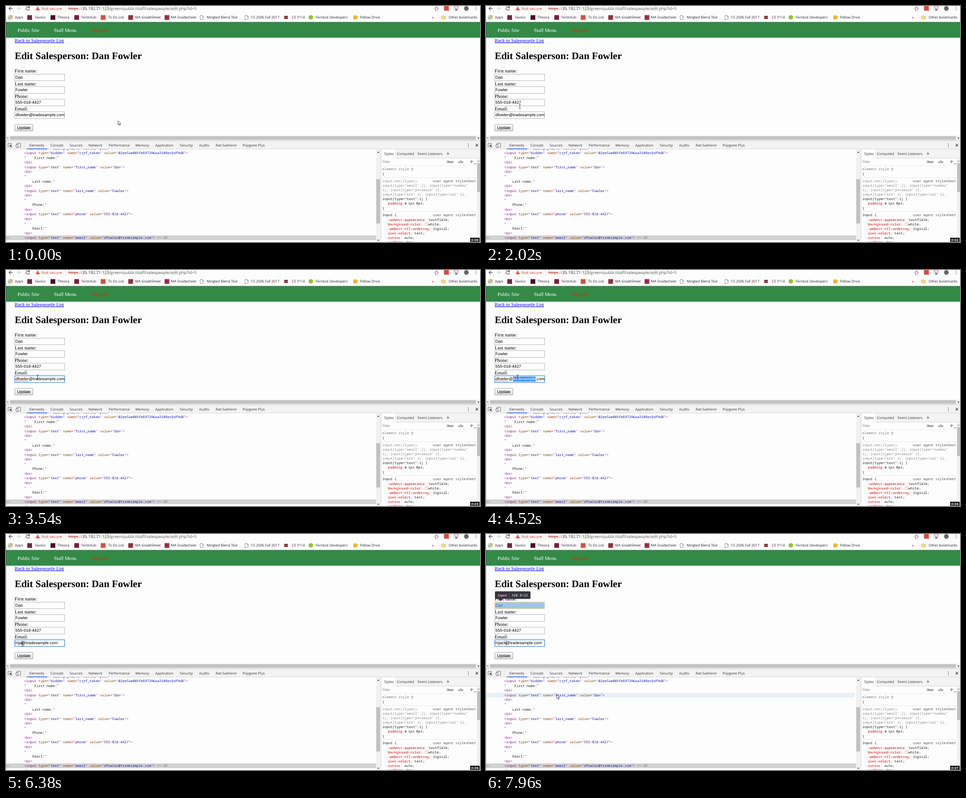
Animation of 1058x529 px, one loop 8 s. Source, as an HTML page:

```html
<!DOCTYPE html>
<html lang="en">
<head>
<meta charset="utf-8">
<title>Edit Salesperson</title>
<style>
html, body { margin: 0; width: 100%; height: 100%; overflow: hidden; background: #fdfdfd; }
svg { display: block; width: 100%; height: 100%; text-rendering: geometricPrecision; }
text { white-space: pre; }
.ui { font: 7.8px "Open Sans", "Noto Sans", sans-serif; fill: #333; }
.bar { font: 9.2px "Open Sans", "Noto Sans", sans-serif; fill: #555; }
.serif { font: 11.12px "Liberation Serif", serif; fill: #000; }
.form { font: 9.22px "Liberation Sans", sans-serif; fill: #000; }
.mono { font: 7.617px "Noto Sans Mono", "DejaVu Sans Mono", monospace; fill: #222; }
.clock { font: bold 6.9px "DejaVu Sans", sans-serif; fill: #fff; }
.tag { fill: #881280; } .attr { fill: #994500; } .val { fill: #1a1aa6; }
.prop { fill: #c80000; } .dim { fill: #888; }
</style>
</head>
<body>
<svg id="stage" viewBox="0 0 1058 529" preserveAspectRatio="none"></svg>
<script>
const stage = document.getElementById('stage');
const first = 'Dan', last = 'Fowler', phone = '555-018-4427';
const user = 'dfowler', typed = 'hijack', host = 'tradesample';
const PAPER = '#fdfdfd';
const ROW = 10.556, ROW_TOP = 324.2;
const FIELD_X = 19.6, FIELD_Y = 152.5, FIELD_W = 111.2, FIELD_H = 15, FIELD_GAP = 28.2;
const MAIL_Y = FIELD_Y + 3 * FIELD_GAP;

const esc = s => s.replace(/&/g, '&amp;').replace(/</g, '&lt;');
const text = (cls, x, y, s, more = '') => `<text class="${cls}" x="${x}" y="${y}" ${more}>${s}</text>`;
const span = (cls, s) => `<tspan class="${cls}">${esc(s)}</tspan>`;
const rect = (x, y, w, h, fill, more = '') =>
  `<rect x="${x}" y="${y}" width="${w}" height="${h}" fill="${fill}" ${more}/>`;
const path = (d, fill, stroke = 'none', more = '') => `<path d="${d}" fill="${fill}" stroke="${stroke}" ${more}/>`;
const dot = (x, y, r, fill) => `<circle cx="${x}" cy="${y}" r="${r}" fill="${fill}"/>`;
const dots = (x, y, gap, fill) => [-1, 0, 1].map(i => dot(x, y + i * gap, .9, fill)).join('');

function toolbar() {
  let s = rect(0, 35, 1058, 1, '#cfcfcf');
  s += path('M15 5.5H7M10.5 1.5L6.5 5.5L10.5 9.5', 'none', '#555', 'stroke-width="1.3"');
  s += path('M24 5.5H32M28.5 1.5L32.5 5.5L28.5 9.5', 'none', '#ccc', 'stroke-width="1.3"');
  s += path('M51.5 3A4 4 0 1 0 52.5 6.3M52.5 .5V4H49', 'none', '#555', 'stroke-width="1.3"');
  s += path('M71 1L75.5 9.5H66.5Z', '#c5372c') + rect(70.5, 4, 1, 2.8, '#fff') + rect(70.5, 7.4, 1, 1, '#fff');
  s += text('bar', 79, 9, 'Not secure', 'style="fill:#c5372c"') + rect(132, 0, .8, 11, '#ccc');
  s += text('bar', 139, 9, '<tspan fill="#c5372c" text-decoration="line-through">https</tspan>://' +
    '<tspan fill="#222">35.192.71.123</tspan>/green/public/staff/salespeople/edit.php?id=5');
  s += path('M961 1L962.4 4.3L965.8 4.6L963.2 6.8L964 10.2L961 8.4L958 10.2L958.8 6.8L956.2 4.6L959.6 4.3Z', 'none', '#666', 'stroke-width=".9"');
  s += rect(977.5, 0, 11, 10.5, '#db4c3f') + rect(999, 0, 12, 11, '#e4e4e4');
  s += path('M1003.6 7.5V6A3.2 3.2 0 1 1 1006.4 6V7.5ZM1003.6 8.4H1006.4V9.6H1003.6Z', '#fff', '#444', 'stroke-width=".9"');
  s += dot(1027.5, 5.5, 5.2, '#666') + dots(1049.5, 5.5, 3.2, '#555');

  const tints = ['#db4437', '#f4b400', '#0f9d58', '#4285f4'];
  for (let i = 0; i < 9; i++) s += rect(5.5 + i % 3 * 3.2, 21 + Math.floor(i / 3) * 3.2, 2.3, 2.3, tints[(i * 3 + 1) % 4]);
  const sheet = x => path(`M${x} 21H${x + 4.5}L${x + 7} 23.5V30.5H${x}ZM${x + 4.5} 21V23.5H${x + 7}`, '#fff', '#777', 'stroke-width=".8"');
  const box = (x, c) => rect(x, 20.5, 10.5, 10.5, c);
  s += box(47.5, '#75233c') + box(99.5, '#4a0f1c') + box(152.5, '#75233c') + box(211.5, '#db4c3f');
  s += box(273, '#993038') + box(354, '#993038') + sheet(433.5) + sheet(533.5);
  s += rect(621, 22, 8, 7, '#963c35') + dot(680.5, 25.5, 5, '#9bbf3b') + dot(779.5, 25.5, 5, '#efb727');
  s += path('M972 21.5H976L977 22.8H981V30H972Z', '#f5d489', '#e2bb62', 'stroke-width=".5"');
  s += rect(967, 20, .6, 11, '#ddd');
  [[20, 'Apps'], [64, 'Tavoro'], [115, 'Thesira'], [168, 'TerloHub'], [228, 'To Do List'],
   [288.5, 'MA GradeSheet'], [368.5, 'MA Gradesheet'], [448, 'Mingled Blend Text'],
   [547, 'CS 2506 Fall 2017'], [638, 'CS 3114'], [691, 'Fernbot Developers'],
   [790, 'Pellow Drive'], [951, '»'], [988, 'Other bookmarks']
  ].forEach(([x, w]) => s += text('ui', x, 28.3, w, 'style="fill:#222"'));
  return s;
}

const field = (y, value) => rect(FIELD_X, y, FIELD_W, FIELD_H, '#fff', 'stroke="#a9a9a9" stroke-width=".9"') +
  text('form', 21, y + 10.2, value);

function page() {
  let s = rect(0, 36, 1058, 35, '#338a47');
  s += text('serif', 25.7, 57.6, 'Public Site', 'style="fill:#fff"');
  s += text('serif', 107, 57.6, 'Staff Menu', 'style="fill:#fff"');
  s += text('serif', 190.8, 57.6, 'Log out', 'style="fill:#f31a10"');
  s += text('serif', 19.3, 81, 'Back to Salespeople List', 'style="fill:#00e" text-decoration="underline"');
  s += text('serif', 19.4, 118.8, `Edit Salesperson: ${first} ${last}`, 'style="font-weight:bold;font-size:22.25px"');
  ['First name:', 'Last name:', 'Phone:', 'Email:'].forEach((w, i) => s += text('serif', 19.3, 149.4 + FIELD_GAP * i, w));
  [first, last, phone].forEach((v, i) => s += field(FIELD_Y + FIELD_GAP * i, v));
  s += rect(19.5, 265.2, 40.7, 14.8, 'url(#face)', 'stroke="#999" stroke-width=".9" rx=".6"') + text('form', 25, 275.8, 'Update');
  s += rect(0, 290.5, 1058, 11, '#f1f1f1') + rect(9, 291.8, 1040, 8.2, '#c3c3c3');
  s += path('M5 293.5V298.5L2 296Z', '#888') + path('M1053.5 293.5V298.5L1056.5 296Z', '#444');
  return s;
}

const tag = (name, attrs) => span('tag', '<' + name) + Object.entries(attrs).map(([k, v]) =>
  span('attr', ' ' + k) + span('tag', '="') + span('val', v) + span('tag', '"')).join('') + span('tag', '>');
const input = (name, value, type = 'text') => tag('input', { type, name, value });
const row = (i, s) => text('mono', 40.5, (ROW_TOP + ROW * i + 8).toFixed(2), s);

function elements() {
  const br = tag('br', {});
  const block = (label, name, value) => ['"', `    ${label}:"`, br, input(name, value), br];
  const rows = [
    tag('form', { action: 'edit.php?id=5', method: 'post' }),
    input('csrf_token', '02ee5ae005fe697396aa3108ec6df9d8', 'hidden'),
    '"    First name:"', br, input('first_name', first), br,
    ...block('Last name', 'last_name', last),
    ...block('Phone', 'phone', phone),
    ...block('Email', 'email', `${user}@${host}.com`)
  ];
  rows[19] += span('dim', ' == $0');
  let s = rect(0, ROW_TOP + 18 * ROW, 826, ROW, '#d2d2d2');
  [1.8, 4, 6.2].forEach(x => s += dot(x, 519.6, .6, '#555'));
  s += '<g clip-path="url(#tree)">' + rows.map((r, i) => row(i - 1, r)).join('') + '</g>';
  s += rect(826, 321, 9.5, 208, '#f1f1f1') + rect(826.5, 388, 8.5, 99.5, '#c1c1c1');
  s += path('M828.5 329H833.5L831 326Z', '#555') + path('M828.5 524H833.5L831 527Z', '#555');
  return s;
}

function styles() {
  const X = 840, IN = 852.5, R = 1049;
  const line = (x, c, s, more) => text('mono', x, c + 2.8, s, more);
  const decl = (c, k, v) => line(IN, c, span('prop', k) + ': ' + v + ';');
  const rule = y => rect(837, y, 214, .7, '#ddd');
  const agent = c => line(R, c, 'user agent stylesheet', 'text-anchor="end" style="fill:#555"');
  let s = rect(837, 321, 221, 208, PAPER) + rect(837, 321, 221, 20, '#f3f3f3') + rect(838, 321, 30.5, 20, PAPER);
  s += rect(836.5, 321, .8, 208, '#c4c4c4') + rect(868.5, 340.5, 190, .7, '#ccc') + rule(357.5);
  s += text('ui', 844, 334.3, 'Styles') + text('ui', 872.5, 334.3, 'Computed') + text('ui', 919, 334.3, 'Event Listeners') +
    text('ui', 983.5, 334.3, '»', 'style="font-size:12px"');
  s += text('ui', X, 352, 'Filter', 'style="fill:#777"') + text('ui', 983, 352, ':hov', 'style="font-weight:600"') +
    text('ui', 1008, 352, '.cls', 'style="font-weight:600"');
  s += path('M1035.5 349H1042.5M1039 345.5V352.5', 'none', '#555') + path('M1048 352V355H1045Z', '#555');
  s += line(X, 365.5, '<tspan fill="#777">element.style</tspan> {') + line(X, 376.5, '}') + rule(384.5);
  ['input:not([type]),', 'input[type="email" i], input[type="number"', 'i], input[type="password" i],',
   'input[type="tel" i], input[type="url" i],'].forEach((w, i) => s += line(X, 392 + 10 * i, w, 'style="fill:#8a8a8a"'));
  s += agent(392) + line(X, 432, 'input[type="text" i] {') + line(IN, 442.5, span('prop', 'padding') + ':');
  s += path('M890.5 440V445.5L895 442.7Z', '#666') + line(897.5, 442.5, '1px 0px;') + line(X, 453, '}') + rule(460.5);
  s += line(X, 468, 'input {') + agent(468) + decl(479, '-webkit-appearance', 'textfield');
  s += decl(489, 'background-color', '<tspan dx="8.4">white</tspan>') +
    rect(935.7, 486, 6, 6, '#fff', 'stroke="#999" stroke-width=".7"');
  s += decl(499, '-webkit-rtl-ordering', 'logical') + decl(509, 'user-select', 'text') + decl(519, 'cursor', 'auto') +
    decl(529.5, 'padding', '1px');
  s += rect(1051, 342, 7, 187, '#f1f1f1') + rect(1051.5, 352, 6.5, 65, '#c1c1c1') + path('M1052.5 348.5H1057L1054.7 345.5Z', '#999');
  return s;
}

function panel() {
  let s = rect(0, 302, 1058, 19, '#f3f3f3') + rect(0, 301.7, 1058, .8, '#b5b5b5') + rect(0, 320.3, 1058, .7, '#ccc');
  s += path('M12.5 311V308H4.5V315.5H8', 'none', '#666') + path('M8 310.5L14 313L11.4 314L13.8 316.4L12.8 317.4L10.5 315L9.6 317.4Z', '#555');
  s += path('M24.5 311V307.5H32.5V316.5H28', 'none', '#666') + rect(22.5, 310.5, 4, 6.5, '#fff', 'stroke="#555"');
  s += rect(40, 306, .7, 12, '#ccc') + rect(46, 319.2, 46, 1.6, '#3b83ef');
  [[52, 'Elements'], [99, 'Console'], [142, 'Sources'], [184, 'Network'], [229, 'Performance'], [289, 'Memory'],
   [333, 'Application'], [388, 'Security'], [431, 'Audits'], [468, 'Net Gatherer'], [528, 'Popgone Plus']
  ].forEach(([x, w]) => s += text('ui', x, 315, w));
  s += dots(1032, 312, 3.3, '#555') + path('M1048 309L1054 315M1054 309L1048 315', 'none', '#444', 'stroke-width="1.2"');
  return s;
}

// Inspector overlay for the first name field
const overlay = rect(FIELD_X, FIELD_Y, FIELD_W, FIELD_H, '#6fa8dc', 'fill-opacity=".66" stroke="#ffe08a" stroke-opacity=".8" stroke-width="1.4"') +
  path('M28 145H37L32.5 150.5Z', '#33363d') + rect(20, 128.5, 79.3, 17, '#33363d', 'rx="2"') +
  text('mono', 26, 140, 'input', 'style="fill:#ee9bea;font-size:7px;font-weight:600"') + rect(51.3, 133, .6, 9, '#777') +
  text('mono', 57, 140, '160.8×22', 'style="fill:#eee"');

stage.innerHTML = `<defs>
  <linearGradient id="face" x2="0" y2="1"><stop stop-color="#fbfbfb"/><stop offset="1" stop-color="#dcdcdc"/></linearGradient>
  <clipPath id="tree">${rect(0, 321, 826, 208, '#000')}</clipPath>
  <clipPath id="inner">${rect(20, 236, 110.3, 17, '#000')}</clipPath></defs>` +
  rect(0, 0, 1058, 529, PAPER) + toolbar() + page() +
  rect(FIELD_X, MAIL_Y, FIELD_W, FIELD_H, '#fff', 'id="box"') +
  '<g clip-path="url(#inner)">' + rect(0, 239, 0, 11, '#3390ff', 'id="sel"') + text('form', 21, MAIL_Y + 10.2, '', 'id="mail"') +
  path('', 'none', '#e33', 'id="wave" stroke-width=".7"') + rect(0, 239, .8, 11, '#000', 'id="caret"') + '</g>' +
  rect(0, 0, 823, ROW, '#e8f0fb', 'id="hover"') + elements() + panel() + styles() +
  rect(0, 36, 1, 493, '#000', 'opacity=".18"') + `<g id="tip">${overlay}</g>` +
  rect(1036, 519.5, 21, 9, '#000') + text('clock', 1038, 527, '', 'id="clock"') +
  path('M0 0V9.2L2.1 7.3L3.6 10.8L5.1 10.1L3.6 6.8L6.4 6.6Z', '#fff', '#222', 'id="arrow" stroke-width=".8"') +
  path('M-2.2 -5H-.5L0 -4.5L.5 -5H2.2M0 -4.5V4.5M-2.2 5H-.5L0 4.5L.5 5H2.2', 'none', '#222', 'id="beam" stroke-width=".8"');

const $ = id => document.getElementById(id);
const show = (id, on) => $(id).style.display = on ? '' : 'none';
const set = (id, attrs) => { for (const k in attrs) $(id).setAttribute(k, attrs[k]); };

// The screen refreshes in bursts: start, end, count
const ticks = [0];
[[970, 1920, 8], [2020, 3010, 8], [3110, 3270, 2], [3540, 3690, 2], [3970, 3970, 1], [4400, 5370, 8],
 [5490, 5490, 1], [5890, 6380, 5], [6650, 6650, 1], [7090, 7650, 5], [7960, 7960, 1]
].forEach(([a, b, n]) => {
  for (let i = 0; i < n; i++) ticks.push(n > 1 ? Math.round(a + (b - a) * i / (n - 1)) : a);
});
const seconds = [970, 2020, 3110, 3970, 4950, 5890, 7090];

// Pointer route: time, x, y
const route = [[0, 250, 257], [830, 250, 257], [1420, 57, 165], [1920, 73, 220], [2020, 75.5, 225.5], [2500, 66, 234],
  [3010, 69.5, 239.5], [3270, 70.5, 240], [4520, 70.5, 240], [5230, 33, 246], [5370, 37, 248], [5890, 38, 247],
  [6950, 38, 247], [7090, 45, 262], [7370, 105, 335], [7510, 130, 358], [7650, 141, 361], [7960, 158, 360]];

function pointer(t) {
  const i = route.findIndex(p => p[0] > t);
  if (i < 0) return route[route.length - 1].slice(1);
  const [a, x, y] = route[i - 1], [b, u, v] = route[i], k = (t - a) / (b - a);
  return [x + (u - x) * k, y + (v - y) * k];
}

function mailState(t) {
  const n = t < 5890 ? 0 : t < 6010 ? 1 : t < 6130 ? 2 : t < 6250 ? 3 : t < 6650 ? 4 : 6;
  const name = n ? typed.slice(0, n) : user;
  const value = `${name}@${host}.com`, at = name.length;
  let from = 0, to = 0;
  if (!n && t >= 3690) {
    if (t < 5230) { from = at + 1; to = from + host.length; }
    else if (t >= 5370) to = t < 5490 ? value.length : at;
  }
  return { value, at, from, to, typing: n > 0 };
}

function drawMail(t) {
  const { value, at, from, to, typing } = mailState(t), mail = $('mail');
  const focus = t >= 3540;
  mail.innerHTML = `${value.slice(0, from)}<tspan fill="#fff">${value.slice(from, to)}</tspan>${value.slice(to)}`;
  const edge = n => 21 + (n ? mail.getSubStringLength(0, n) : 0);
  set('box', { stroke: focus ? '#4d8ae8' : '#a9a9a9', 'stroke-width': focus ? 1.4 : .9 });
  set('sel', { x: edge(from), width: edge(to) - edge(from) });
  set('caret', { x: edge(at) });
  show('caret', typing);
  let d = 'M21 249.8';
  for (let x = 22, up = 1; x < edge(at); x++, up = !up) d += `L${x} ${up ? 248.8 : 249.8}`;
  set('wave', { d });
  show('wave', focus && !typing);
}

function draw(time) {
  let t = 0;
  for (const k of ticks) if (k <= time) t = k;
  drawMail(t);
  const [x, y] = pointer(t);
  const arrow = t < 1300 || t >= 5370 && t < 5890 || t >= 7090;
  show('arrow', arrow);
  show('beam', !arrow);
  set(arrow ? 'arrow' : 'beam', { transform: `translate(${x} ${y})` });
  const over = y > ROW_TOP ? Math.floor((y - ROW_TOP) / ROW) : -1;
  show('hover', over >= 0);
  set('hover', { y: ROW_TOP + over * ROW });
  show('tip', over === 3);
  $('clock').textContent = '0:0' + seconds.filter(s => s <= t).length;
}

const start = performance.now();
function loop(now) {
  draw(Math.max(0, now - start) % 8000);
  requestAnimationFrame(loop);
}
draw(0);
requestAnimationFrame(loop);
</script>
</body>
</html>
```
